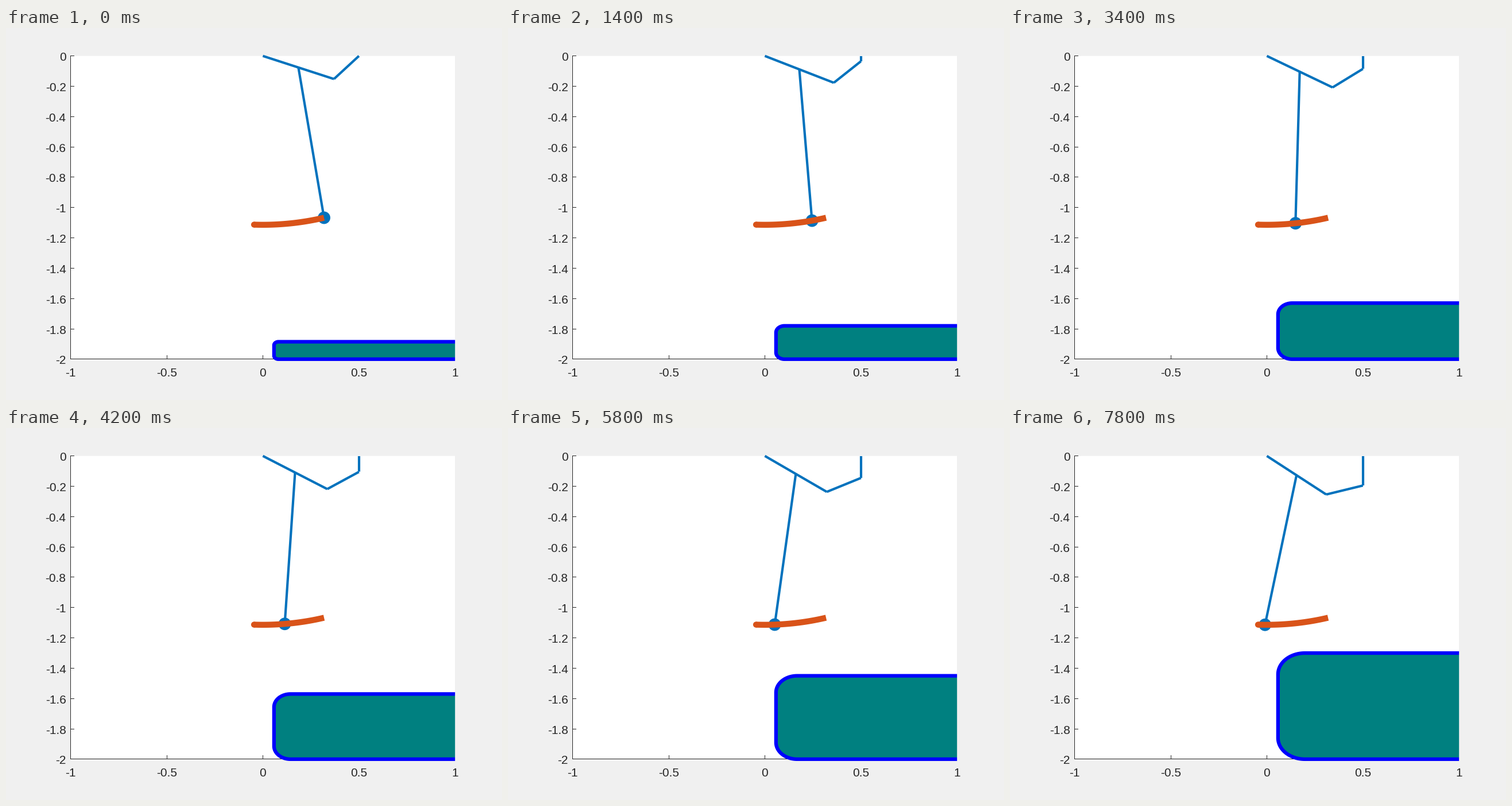
A matplotlib script that plays this animation: 864 px wide and 648 px high, repeating every 8000 ms.

```python
import numpy as np
import matplotlib.pyplot as plt
from matplotlib.animation import FuncAnimation
from matplotlib.collections import LineCollection
from matplotlib.patches import Circle, Polygon, Rectangle

W, H = 864, 648
LEFT, RIGHT, TOP, BOTTOM = 112.6, 782.2, 48.7, 576.9
BLUE, ORANGE, INK, PAPER = "#0072bd", "#d95319", "#262626", "#f0f0f0"
FRAMES, STEP_MS = 40, 200

# Linkage: crank from the origin, rod to a slider on x = 0.5, leg fixed to the crank
CRANK, ROD, LEG, SLIDE_X = 0.4, 0.2, 1.0, 0.5
LEG_ANGLE = np.radians(30)
SLIDE_STEP = 0.005
STROKE = 0.25
TRAIL_WIDTH = 10.4

# one point equals one pixel at 72 dpi
fig = plt.figure(figsize=(W / 72, H / 72), dpi=72, facecolor=PAPER)
ax = fig.add_axes([0, 0, 1, 1])
ax.set_xlim(0, W)
ax.set_ylim(H, 0)
ax.axis("off")


def to_px(x, y):
    px = LEFT + (RIGHT - LEFT) * (np.asarray(x) + 1) / 2
    py = TOP - (BOTTOM - TOP) * np.asarray(y) / 2
    return np.stack([px, py], axis=-1)


def pose(slide):
    """Return crank tip, crank middle and foot for a slider at depth `slide`."""
    reach = np.hypot(SLIDE_X, slide)
    inner = np.arccos((CRANK**2 + reach**2 - ROD**2) / (2 * CRANK * reach))
    theta = np.arctan2(slide, SLIDE_X) + inner
    tip = CRANK * np.array([np.cos(theta), -np.sin(theta)])
    mid = tip / 2
    swing = LEG_ANGLE - theta
    foot = mid + LEG * np.array([np.sin(swing), -np.cos(swing)])
    return tip, mid, foot


def tank_outline(height):
    """Rounded rectangle standing on y = -2, running past the right edge."""
    x0, x1, y0 = 0.058, 1.5, -2.0
    r = 0.2 * height
    a = np.linspace(0, np.pi / 2, 24)
    corners = [
        (x1 - r, y0 + height - r),
        (x0 + r, y0 + height - r),
        (x0 + r, y0 + r),
        (x1 - r, y0 + r),
    ]
    turns = [a + k * np.pi / 2 for k in range(4)]
    xs = np.concatenate([cx + r * np.cos(t) for (cx, _), t in zip(corners, turns)])
    ys = np.concatenate([cy + r * np.sin(t) for (_, cy), t in zip(corners, turns)])
    return to_px(xs, ys)


def block(x0, y0, x1, y1, **style):
    ax.add_patch(Rectangle((x0, y0), x1 - x0, y1 - y0, lw=0, snap=False, **style))


def rule(x0, y0, x1, y1):
    ax.plot([x0, x1], [y0, y1], color=INK, lw=1, solid_capstyle="butt",
            snap=False, zorder=1)


def pixel(v):
    """Centre of the pixel that holds v."""
    return np.floor(v) + 0.5


def draw_axes():
    block(LEFT, TOP, RIGHT, BOTTOM, fc="white", zorder=0)
    label = dict(color=INK, family="Liberation Sans", size=20.83,
                 va="baseline", zorder=7)
    left, top, bottom = np.floor([LEFT, TOP, BOTTOM + 1])
    rule(pixel(LEFT), top, pixel(LEFT), bottom)
    rule(left, pixel(BOTTOM), np.floor(RIGHT), pixel(BOTTOM))
    for i, y in enumerate(np.linspace(TOP, BOTTOM, 11)):
        rule(left, pixel(y), left + 7, pixel(y))
        ax.text(104.5, y + 8.5, f"{-i / 5 if i else 0:g}", ha="right", **label)
    for i, x in enumerate(np.linspace(LEFT, RIGHT, 5)):
        col = min(pixel(x), pixel(RIGHT - 1))
        rule(col, bottom - 7, col, bottom)
        ax.text(x, 607, f"{i / 2 - 1:g}", ha="center", **label)


draw_axes()

tank = Polygon(tank_outline(0.115), closed=True, fc="#008080", ec="#0000ff",
               lw=6.25, joinstyle="round", zorder=2)
ax.add_patch(tank)
# the right margin hides the part of the tank outside the plot
block(RIGHT, 0, W, H, fc=PAPER, zorder=2.5)

bars = LineCollection([], colors=BLUE, linewidths=4.17, capstyle="butt", zorder=3)
ax.add_collection(bars, autolim=False)
foot_dot = Circle((0, 0), 10.9, fc=BLUE, lw=0, zorder=4)
ax.add_patch(foot_dot)

# The foot's whole path, rounded where it turns back
path = to_px(*np.array([pose(s)[2] for s in np.linspace(0, STROKE, 26)]).T)
ax.plot(*path.T, color=ORANGE, lw=TRAIL_WIDTH, solid_capstyle="butt",
        solid_joinstyle="round", zorder=5)
ax.add_patch(Circle(path[-1], TRAIL_WIDTH / 2, fc=ORANGE, lw=0, zorder=5))


def update(n):
    slide = SLIDE_STEP * n
    tip, mid, foot = pose(slide)
    slider = (SLIDE_X, -slide)
    joints = [((0, 0), tip), (tip, slider), (slider, (SLIDE_X, 0)), (mid, foot)]
    bars.set_segments([to_px(*np.array(pair).T) for pair in joints])
    foot_dot.center = to_px(*foot)
    tank.set_xy(tank_outline(0.115 + 0.015 * n))
    return bars, foot_dot, tank


anim = FuncAnimation(fig, update, frames=FRAMES, interval=STEP_MS,
                     repeat=True, repeat_delay=0)
plt.show()
```
